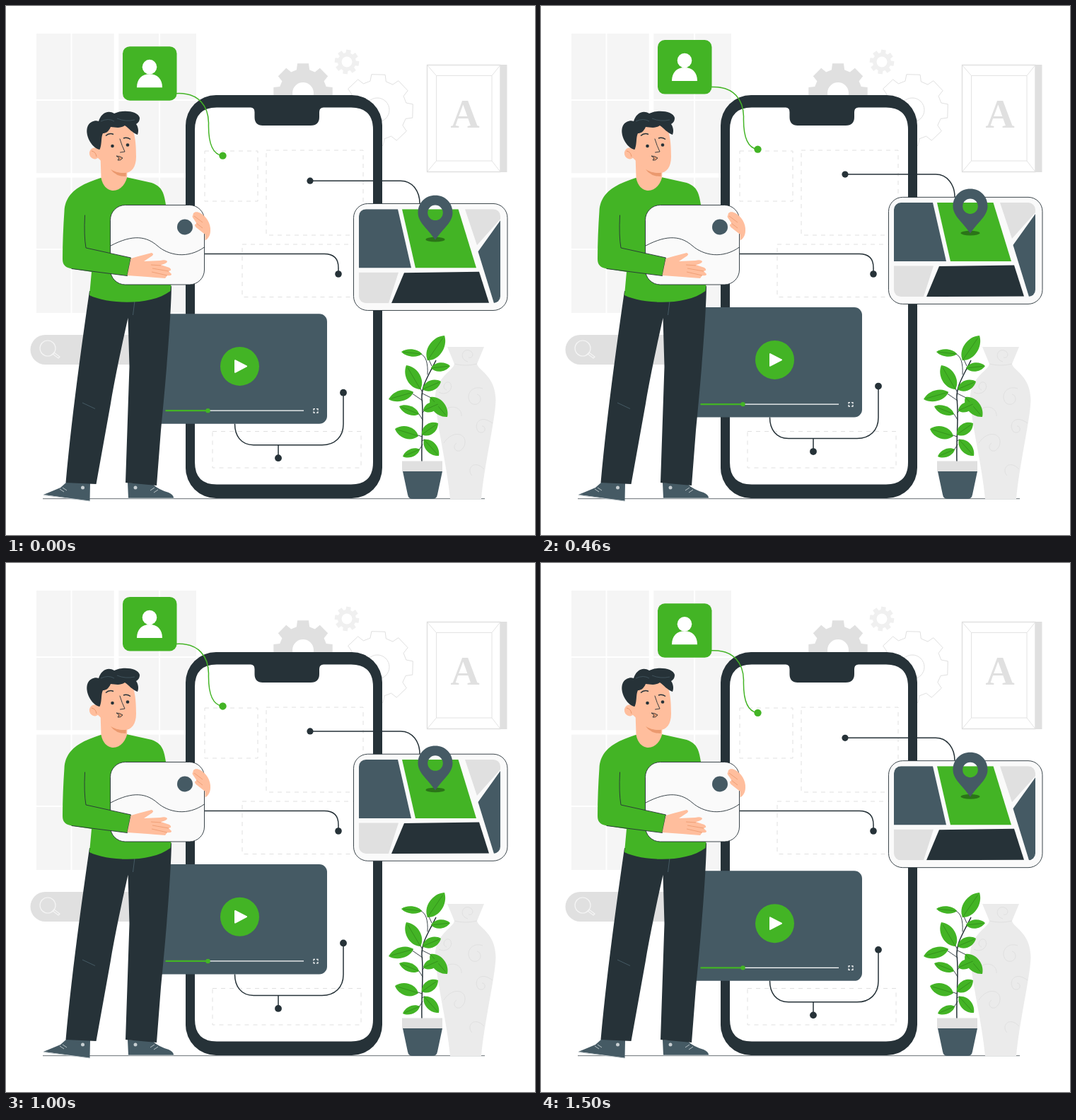
An HTML page for the animation above (1540 ms loop, 748x748 px).

```html
<!DOCTYPE html>
<html lang="en">
<head>
<meta charset="utf-8">
<title>App builder</title>
<style>
  html, body { margin: 0; width: 100%; height: 100%; overflow: hidden; background: #fff; }
  svg { display: block; width: 100vw; height: 100vh; }
  .green { fill: #43b425; } .dark { fill: #263238; } .slate { fill: #455a64; }
  .grey { fill: #e0e0e0; } .pale { fill: #ebebeb; } .skin { fill: #ffbe9d; }
  .line { fill: none; stroke: #263238; stroke-width: 1.5; }
  .thin { fill: none; stroke: #263238; stroke-width: .9; stroke-linecap: round; stroke-linejoin: round; }
  .faint { fill: none; stroke: #e0e0e0; }
</style>
</head>
<body>
<svg viewBox="0 0 748 748">
  <clipPath id="mapArea"><rect x="499" y="287" width="200" height="133" rx="10"/></clipPath>

  <!-- room -->
  <path fill="#f5f5f5" d="M43 39H269V434H43z"/>
  <path fill="none" stroke="#fff" stroke-width="2" d="M92.5 39V434M217 39V434M43 133H269M43 344H269"/>
  <path fill="none" stroke="#fff" stroke-width="6.5" d="M156 39V434M43 239.5H269"/>
  <rect class="grey" x="34.500" y="465" width="196" height="42" rx="21"/>
  <g fill="none" stroke="#f5f5f5" stroke-width="1.2"><circle cx="59" cy="484" r="11"/><path d="M66 492L68 490L76 496L74 498z"/></g>
  <g id="gears"></g>
  <path class="grey" d="M699 83H708.500V235H699z"/>
  <path class="faint" stroke-width="1.4" d="M595.500 83.500H699V234.500H595.500z"/>
  <path class="faint" stroke-width=".9" d="M608.500 98.500H687V219H608.500zM595.500 83.500L608.500 98.500M699 83.500L687 98.500M595.500 234.500L608.500 219M699 234.500L687 219"/>
  <text class="grey" x="649" y="172" font-family="'Liberation Serif', serif" font-weight="700" font-size="57" text-anchor="middle">A</text>
  <path stroke="#263238" stroke-width=".7" d="M52 696.700H677"/>

  <!-- vase and plant -->
  <path class="pale" d="M624 482H676L666 506C667 515 692 522 692.500 557C692 585 676 650 672 697H628C624 650 607 585 607 552C608 525 633 515 634 506z"/>
  <path class="faint" d="M634 506Q650 510 666 506M653 503C640 499 645 484 655 487C663 490 660 499 654 497M612 546C622 552 634 542 628 533C621 528 615 540 623 543M674 541C658 535 648 552 658 562C670 568 676 552 666 549M622 570C634 563 645 570 644 580M688 590C670 576 660 592 668 602C678 607 680 594 673 594M619 618C632 598 654 604 648 622C641 637 628 625 637 618M676 655C662 640 650 655 659 664"/>
  <path class="line" stroke-width="2" d="M588 645C587 610 591 580 588 555C587 538 596 525 608 501"/>
  <path class="thin" d="M589 620L584 628M588 615L592 613M588 609L583 607M589 606V600M589 585L584 577M589 575L593 571M589 558L573 547M589 548L601 554M588 545L583 535M592 536L590 543M600 516L604 511M596 521C597 506 594 494 586 492M602 509L598 500"/>
  <g id="leaves"></g>
  <path class="grey" d="M560 643.500H617V658H560z"/>
  <path class="slate" d="M561 658H617L610 691Q609 697 603 697H575Q569 697 568 691z"/>

  <!-- phone -->
  <rect class="dark" x="254" y="126" width="278" height="570" rx="43"/>
  <path fill="#fff" d="M298 143.500H346Q351.500 143.500 351.500 150V157Q351.500 169 363 169H431Q443 169 443 157V150Q443 143.500 449 143.500H488Q519 143.500 519 175V645Q519 676.500 488 676.500H298Q267 676.500 267 645V175Q267 143.500 298 143.500z"/>
  <path class="faint" stroke="#e6e6e6" stroke-dasharray="6 6" d="M281 205H356V276H281zM368 204H505V324H368zM334 337H505V411.500H334zM292 601.500H502V653H292z"/>
  <path class="line" d="M281 350.500H450Q470 350.500 470 370V379"/>
  <circle class="dark" cx="470" cy="379" r="4.800"/>

  <g id="floating">
    <!-- profile -->
    <rect class="green" x="165" y="57" width="76.500" height="76.500" rx="10"/>
    <path fill="#fff" d="M185 115C185 103 192 96 203 96S221 103 221 115z"/>
    <circle cx="203" cy="86" r="10.300" fill="#fff"/>
    <path class="line" style="stroke:#43b425" d="M241 123.500C274 122 286 143 286.500 165C286 183 288 209 306 211.500"/>
    <circle class="green" cx="306.500" cy="211.500" r="5.200"/>

    <!-- video -->
    <rect class="slate" x="205" y="435" width="249" height="155.500" rx="11"/>
    <circle class="green" cx="330.500" cy="509.300" r="27.500"/>
    <path fill="#fff" stroke="#fff" stroke-width="2" stroke-linejoin="round" d="M324 501L340 509.300L324 517.600z"/>
    <path stroke="#fff" stroke-width="1.300" d="M285 572H421"/>
    <path stroke="#43b425" stroke-width="2.200" d="M225.500 572H285"/>
    <circle class="green" cx="285.500" cy="572" r="3.200"/>
    <path fill="none" stroke="#fff" stroke-width="1.200" d="M437 569.500H435V571.500M439 569.500H441V571.500M437 575H435V573M439 575H441V573"/>
    <path class="line" d="M323.500 590.500C323.500 607 332 620.500 350 620.500H447C465 620.500 477 609 477 591V547M385 620.500V639"/>
    <circle class="dark" cx="477" cy="546.500" r="4.900"/>
    <circle class="dark" cx="385" cy="639" r="4.900"/>

    <!-- map -->
    <path class="line" d="M430 247H558C575 247 585 262 585 279"/>
    <circle class="dark" cx="430" cy="247" r="4.600"/>
    <rect x="491.500" y="279.300" width="217.500" height="151" rx="20" fill="#fafafa" stroke="#263238" stroke-width=".9"/>
    <g clip-path="url(#mapArea)">
      <path class="slate" d="M499 287H554L573 370H499zM699 303V420H690L667.500 347z"/>
      <path class="green" d="M560 287H639.500L665 370H579z"/>
      <path class="grey" d="M649 287H699V301L666 338zM499 376.500H555L541 420H499z"/>
      <path class="dark" d="M563 377L669 375.500L683 419.500L545 420z"/>
    </g>
    <ellipse cx="607" cy="330" rx="13.500" ry="3.300" fill="#2b7418"/>
    <path class="slate" fill-rule="evenodd" d="M607 267.500C621 267.500 631.500 278 631.500 292C631.500 306 618 314 607 330.500C596 314 582.500 306 582.500 292C582.500 278 593 267.500 607 267.500zM607 281.300A10.800 10.800 0 1 0 607 302.900A10.800 10.800 0 1 0 607 281.300z"/>
  </g>

  <!-- person -->
  <path class="slate" d="M86 673L119 675L118.500 700L53 691Q70 684 77 681zM172 674L207 676Q216 684 230 688Q237 691 237 696H173z"/>
  <path fill="none" stroke="#b9c2c6" d="M53 691.500L118.500 700M173 696H237M76 683L82 687M80 681L86 685M210 681L204 685M215 684L209 688"/>
  <g fill="#c7ced1"><circle cx="108.500" cy="681" r="2.500"/><circle cx="183" cy="681" r="2.500"/></g>
  <path class="dark" d="M118 403L234 396C233 450 224 550 219 600L213 678L169 674L174.500 510L172.500 441C166 470 154 525 148 562L127.500 676L84.500 674C92 590 104 500 118 403z"/>
  <path fill="none" stroke="#455a64" d="M108 561L126 569.500M182 417L179.500 437"/>
  <path class="green" d="M134 243C110 251 84 261 82.500 290C81 312 80 335 80 358C80 367 85 370 93 371.500L121 376L118 409C145 422 205 424 232.500 403L234 390L226 281C223 261 219 255 206 250L170 242z"/>
  <path class="skin" d="M133 195L134.500 243C139 267 164 267 171 243L172 225z"/>
  <path fill="#eb996e" d="M148 231Q160 238 170 235L169.500 241Q155 241 148 231z"/>
  <path class="skin" d="M131 188C137 166 153 163 168 165C182 168 184 190 184 213C184 233 173 240 157 234C145 230 138 222 129 214z"/>
  <ellipse class="skin" cx="125.500" cy="208.500" rx="7.500" ry="8" transform="rotate(-12 125 209)"/>
  <path fill="none" stroke="#eb996e" d="M121 205Q127 206 128 213"/>
  <path class="dark" d="M132.500 203C121 201 110 181 116 169C119 163 127 161 131 163C134 152 144 146 153 152C164 146 187 148 189 158C189 163 187 165 184 167C187 171 188 177 186 182C178 179 174 173 168 169C160 174 154 171 148 171C145 178 141 180 137 180C134 186 136 195 132.500 203z"/>
  <path fill="none" stroke="#455a64" stroke-width=".8" d="M134 163Q145 158 153 163M157 159Q169 164 182 161"/>
  <g class="dark"><circle cx="150.500" cy="198" r="2.300"/><circle cx="172" cy="196.500" r="2.300"/></g>
  <path class="line" stroke-width="2" d="M141 183.500Q146 179 152 181.500M166 187Q171 185 176 188.500"/>
  <path class="thin" d="M161 188Q164 198 168 206L161.500 207"/>
  <path d="M156 212Q161 212 165 215Q162 219 158 218L160 215z" fill="#eb996e" stroke="#263238" stroke-width=".9"/>

  <!-- card and hands -->
  <rect x="147.500" y="281.500" width="133" height="112.500" rx="21" fill="#fafafa" stroke="#263238" stroke-width=".9"/>
  <path class="thin" d="M148 339C180 322 199 326 214 339C230 353 257 358 280.500 341"/>
  <circle class="slate" cx="253" cy="312.500" r="11"/>
  <path class="skin" d="M264.500 296C264 291 270 290 275 293C283 297 290 308 289 318C289 325 285 330 281.500 331.500V323L270 314C266 311 266 308 270 308L266 302Q262 297 264.500 296z"/>
  <path fill="none" stroke="#eb996e" stroke-width=".8" d="M266 297L278 306M269 307L278 314"/>
  <path class="green" d="M112 342L176.500 356L171.500 381.500L93 371.500L84 356z"/>
  <path class="thin" d="M111.500 296Q110 325 113 342L176.500 356L171.500 381.500L93 371.500"/>
  <path class="skin" d="M176.500 357L187 354L206 349Q211 351 204 355L195 361L218 360Q226 358 228 361Q228 364 219 366L231 370Q236 374 230 375L234 379Q234 382 228 381L225 385Q211 384 200 383L171.500 381z"/>
  <path fill="none" stroke="#eb996e" stroke-width=".8" d="M205 366L219 367M207 371L230 375M206 376L228 381"/>
</svg>
<script>
  const byId = id => document.getElementById(id);

  function gear(x, y, outer, inner, hole, turn, style) {
    const points = [];
    for (let tooth = 0; tooth < 8; tooth++) {
      [[-.27, inner], [-.19, outer], [.19, outer], [.27, inner]].forEach(([da, r]) => {
        const a = tooth * Math.PI / 4 + turn + da;
        points.push((x + r * Math.cos(a)).toFixed(1) + ' ' + (y + r * Math.sin(a)).toFixed(1));
      });
    }
    const ring = `M${x - hole} ${y}a${hole} ${hole} 0 1 0 ${2 * hole} 0a${hole} ${hole} 0 1 0 ${-2 * hole} 0z`;
    return `<path ${style} fill-rule="evenodd" d="M${points.join('L')}z${ring}"/>`;
  }

  byId('gears').innerHTML =
    gear(420, 123, 42.5, 34, 15, 0, 'class="grey"') +
    gear(482, 79, 17.5, 13, 7.5, .15, 'fill="#f0f0f0"') +
    gear(525, 147, 51, 42, 17, .03, 'class="faint" stroke="#e6e6e6"');

  function leaf([x, y, tipX, tipY, width]) {
    const dx = tipX - x, dy = tipY - y, length = Math.hypot(dx, dy);
    const nx = -dy / length * width * .68, ny = dx / length * width * .68;
    const side = s => [.2, .75].map(k => `${x + dx * k + s * nx} ${y + dy * k + s * ny}`);
    const [a, b] = side(1), [c, d] = side(-1);
    return `<path class="green" d="M${x} ${y}C${a} ${b} ${tipX} ${tipY}C${d} ${c} ${x} ${y}"/>` +
      `<path stroke="#2f8519" stroke-width=".7" d="M${x} ${y}L${x + dx * .9} ${y + dy * .9}"/>`;
  }

  // base x, base y, tip x, tip y, width
  byId('leaves').innerHTML = [
    [596, 501, 620, 466, 20], [588, 492, 559, 489, 10], [601, 512, 628, 509, 12],
    [586, 542, 566, 508, 19], [589, 542, 615, 531, 14], [576, 546, 541, 556, 15],
    [600, 553, 624, 581, 18], [584, 577, 556, 566, 12], [590, 572, 613, 562, 13],
    [583, 608, 550, 598, 17], [588, 606, 611, 590, 15], [591, 613, 612, 636, 15],
    [585, 627, 561, 637, 11]
  ].map(leaf).join('');

  // Linear float of 15 px up and back, shown at 24 steps a second.
  const LOOP = 1540, STEP = 1000 / 24, HALF = 755, RISE = 14.96, PHASE = 22, REST = .6;
  const floating = byId('floating');

  function draw(now) {
    const frame = Math.floor((now % LOOP + 3.4) / STEP);
    const time = (frame * STEP + PHASE) % (2 * HALF);
    const height = (1 - Math.abs(time / HALF - 1)) * RISE;
    floating.setAttribute('transform', `translate(0 ${REST - height})`);
    requestAnimationFrame(draw);
  }
  draw(performance.now());
</script>
</body>
</html>
```
